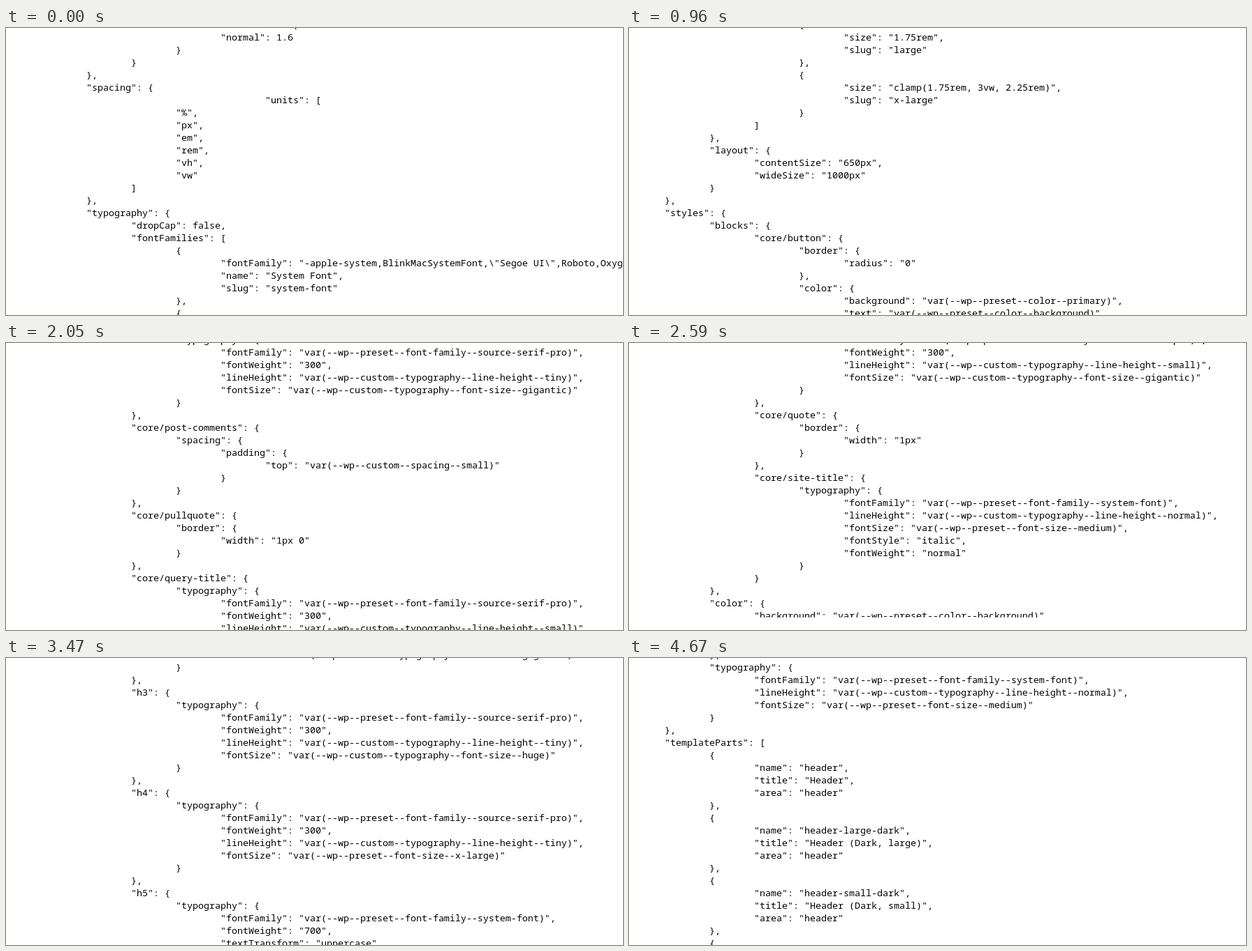
An HTML page that plays this animation: 883 by 412 pixels, repeating every 5880 ms.

```html
<!DOCTYPE html>
<html lang="en">
<head>
<meta charset="utf-8">
<title>Scrolling theme.json</title>
<style>
html, body { margin: 0; width: 100%; height: 100%; overflow: hidden; background: #fff; }
svg { display: block; width: 883px; height: 412px; }
text { font: 13.3333px "Noto Sans Mono", monospace; fill: #000; white-space: pre; }
</style>
</head>
<body>
<svg viewBox="0 0 883 412">
  <g id="page"></g>
  <rect id="unpainted" y="394" width="883" height="18" fill="#fff" visibility="hidden"/>
</svg>
<script>
const ROW = 18, TAB = 64, LEFT = -13, BASELINE = 18;
const LOOP = 5880;

// Builders for the repeated parts of the file
const preset = name => `"var(--wp--preset--${name})"`;
const custom = name => `"var(--wp--custom--${name})"`;
const family = name => `"fontFamily": ${preset("font-family--" + name)}`;
const height = name => `"lineHeight": ${custom("typography--line-height--" + name)}`;
const bigSize = name => `"fontSize": ${custom("typography--font-size--" + name)}`;
const mediumSize = `"fontSize": ${preset("font-size--medium")}`;

const list = items => items.join(",\n");
const block = (key, ...items) => `"${key}": {\n${list(items)}\n}`;
const type = (key, ...items) => block(key, block("typography", ...items));
const serif = (key, line, size) =>
  type(key, family("source-serif-pro"), `"fontWeight": "300"`, height(line), size);
const caps = (key, weight) =>
  type(key, family("system-font"), `"fontWeight": "${weight}"`,
    `"textTransform": "uppercase"`, height("normal"), mediumSize);
const item = (...items) => `{\n${list(items)}\n}`;
const array = (key, items) => `"${key}": [\n${list(items)}\n]`;
const step = (size, slug) => item(`"size": "${size}"`, `"slug": "${slug}"`);
const face = (style, file) => item(
  `"fontFamily": "Source Serif Pro"`, `"fontWeight": "200 900"`,
  `"fontStyle": "${style}"`, `"fontStretch": "normal"`,
  `"src": [ "file:./assets/fonts/SourceSerif4Variable-${file}.ttf.woff2" ]`);
const part = (name, title, area) =>
  item(`"name": "${name}"`, `"title": "${title}"`, `"area": "${area}"`);

const settings = list([
  `"medium": 1.4,\n"normal": 1.6\n}\n}\n}`,
  block("spacing", array("units", ["%", "px", "em", "rem", "vh", "vw"].map(u => `"${u}"`))),
  block("typography",
    `"dropCap": false`,
    array("fontFamilies", [
      item(
        String.raw`"fontFamily": "-apple-system,BlinkMacSystemFont,\"Segoe UI\",Roboto,Oxygen-Sans,Ubuntu,Cantarell,\"Helvetica Neue\",sans-serif"`,
        `"name": "System Font"`, `"slug": "system-font"`),
      item(
        String.raw`"fontFamily": "\"Source Serif Pro\", serif"`,
        `"name": "Source Serif Pro"`, `"slug": "source-serif-pro"`,
        array("fontFace", [face("normal", "Roman"), face("italic", "Italic")]))
    ]),
    array("fontSizes", [
      step("1rem", "small"), step("1.125rem", "medium"), step("1.75rem", "large"),
      step("clamp(1.75rem, 3vw, 2.25rem)", "x-large")
    ])),
  block("layout", `"contentSize": "650px"`, `"wideSize": "1000px"`) + "\n}"
]);

const styles = block("styles",
  block("blocks",
    block("core/button",
      block("border", `"radius": "0"`),
      block("color", `"background": ${preset("color--primary")}`, `"text": ${preset("color--background")}`),
      block("typography", mediumSize)),
    serif("core/post-title", "tiny", bigSize("gigantic")),
    block("core/post-comments",
      block("spacing", block("padding", `"top": ${custom("spacing--small")}`))),
    block("core/pullquote", block("border", `"width": "1px 0"`)),
    serif("core/query-title", "small", bigSize("gigantic")),
    block("core/quote", block("border", `"width": "1px"`)),
    type("core/site-title", family("system-font"), height("normal"), mediumSize,
      `"fontStyle": "italic"`, `"fontWeight": "normal"`)),
  block("color", `"background": ${preset("color--background")}`, `"text": ${preset("color--foreground")}`),
  block("elements",
    serif("h1", "tiny", bigSize("colossal")),
    serif("h2", "small", bigSize("gigantic")),
    serif("h3", "tiny", bigSize("huge")),
    serif("h4", "tiny", `"fontSize": ${preset("font-size--x-large")}`),
    caps("h5", 700),
    caps("h6", 400),
    block("link", block("color", `"text": ${preset("color--foreground")}`))),
  block("spacing", `"blockGap": "1.5rem"`),
  block("typography", family("system-font"), height("normal"), mediumSize));

const parts = array("templateParts", [
  part("header", "Header", "header"),
  part("header-large-dark", "Header (Dark, large)", "header"),
  part("header-small-dark", "Header (Dark, small)", "header"),
  part("footer", "Footer", "footer")
]);

const page = document.getElementById("page");
const unpainted = document.getElementById("unpainted");

// Indent by nesting depth; the first row sits just above the stage
let depth = 5;
list([settings, styles, parts]).split("\n").forEach((line, i) => {
  if (/^[}\]]/.test(line)) depth--;
  const stray = line.startsWith('"units"') ? 3 : 0;
  const text = document.createElementNS("http://www.w3.org/2000/svg", "text");
  text.setAttribute("x", LEFT + TAB * (depth + stray));
  text.setAttribute("y", BASELINE + ROW * (i - 1));
  text.textContent = line;
  page.append(text);
  if (/[{[]$/.test(line)) depth++;
});

// [time in ms, top line]
const scroll = [
  [0, 0], [140, 6], [265, 15], [390, 24], [530, 33], [820, 45], [960, 54],
  [1400, 63], [1540, 69], [1660, 75], [1910, 81], [2050, 84], [2180, 90],
  [2310, 93], [2590, 105], [2740, 111], [2890, 117], [3020, 123], [3170, 129],
  [3320, 135], [3470, 144], [3720, 156], [3870, 165], [4010, 171],
  [4390, 180], [4520, 186], [4670, 189]
];

function draw(ms) {
  const t = ms % LOOP;
  const [, top] = scroll.findLast(([start]) => start <= t);
  page.setAttribute("transform", `translate(0 ${-top * ROW})`);
  // The newest row is briefly blank here
  unpainted.setAttribute("visibility", t >= 2590 && t < 2740 ? "visible" : "hidden");
}

const begin = performance.now();
function tick() {
  draw(performance.now() - begin);
  requestAnimationFrame(tick);
}
tick();
</script>
</body>
</html>
```
